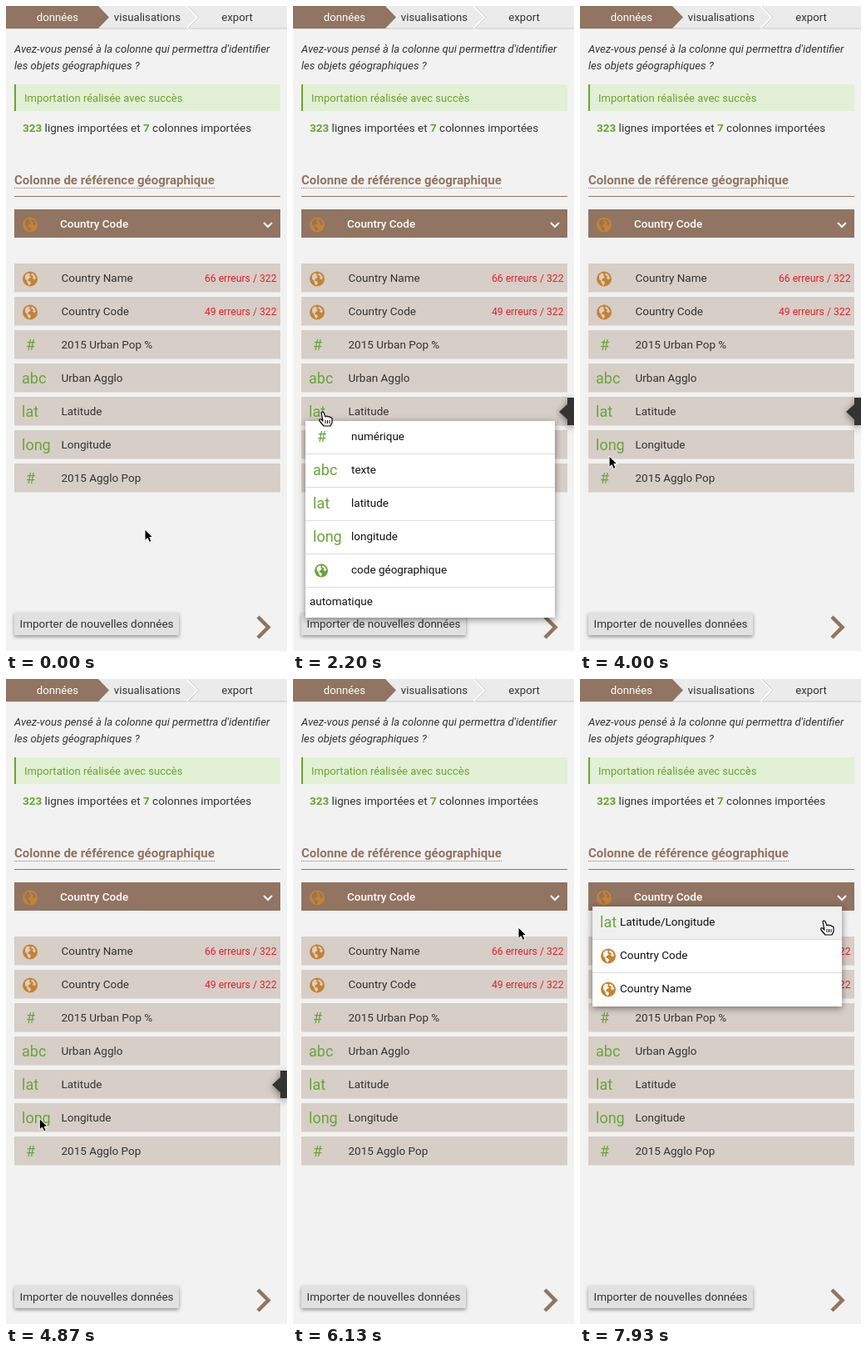
Recreate the animation shown at these times as an HTML page. Size 338x774 px, loop 8 s.

```html
<!DOCTYPE html>
<html lang="fr">
<head>
<meta charset="utf-8">
<title>Colonnes importées</title>
<style>
  html, body { margin: 0; width: 100%; height: 100%; overflow: hidden; background: #f2f2f2; }
  svg { display: block; width: 338px; height: 774px; }
  text { font: 13.5px Roboto, sans-serif; fill: #333; white-space: pre; }
  .tab { font-size: 13.2px; text-anchor: middle; }
  .hint { font-size: 13.1px; font-style: italic; }
  .success { font-size: 13px; fill: #68a52d; }
  .title { font-size: 15px; font-weight: 700; fill: #917461; }
  .count { font-weight: 700; fill: #68a52d; }
  .error { font-size: 12.2px; fill: #e3202c; text-anchor: end; }
  .icon { font-size: 18px; fill: #68a53b; }
  .white { fill: #fff; }
  .strong { font-weight: 500; }
  .menu text:not(.icon) { fill: #111; }
  .shadow { filter: drop-shadow(0 2px 4px #0007); }
  .button { filter: drop-shadow(0 2px 2px #0006); }
</style>
</head>
<body>
<svg id="stage" viewBox="0 0 338 774"></svg>
<script>
const BROWN = '#917461', GREEN = '#68a53b', ORANGE = '#c7822f', ROW = '#d7cec7';
const LOOP = 8000;

const rect = (x, y, w, h, fill, attrs = '') =>
  `<rect x="${x}" y="${y}" width="${w}" height="${h}" fill="${fill}" ${attrs}/>`;
const label = (x, y, content, cls = '') => `<text x="${x}" y="${y}" class="${cls}">${content}</text>`;
const path = (d, fill, attrs = '') => `<path d="${d}" fill="${fill}" ${attrs}/>`;
const line = (x1, y, x2, color, attrs = '') => path(`M${x1} ${y}H${x2}`, 'none', `stroke="${color}" ${attrs}`);

const globe = (x, y, color, land, r = 9) => `<g transform="translate(${x} ${y}) scale(${r / 9})">
  <circle r="9" fill="${color}"/>
  ${path('M-6-4L-3-7L0-6L-1-4L1-2L-2 0L-3 2L0 3L1 5L-1 8L-3 5L-4 2L-6 0Z', land)}
  ${path('M2-7L5-5L7-1L5 1L3-1L4-3L1-5Z', land)}</g>`;

// Type marker: a text symbol or a globe, with its row centred on y.
const marker = (x, y, kind, land) =>
  kind === 'geo' ? globe(x + 10, y + 1, ORANGE, land)
  : kind === 'code' ? globe(x + 10, y + 1, GREEN, land, 8)
  : label(kind === '#' ? x + 5 : x, y + 6, kind, 'icon');

function row([kind, name, errors], i) {
  const y = 326.5 + i * 40;
  return rect(10, y - 17.5, 320, 34.5, ROW) + marker(19, y, kind, ROW) + label(66.5, y + 4.5, name) +
    (errors ? label(325.5, y + 4.5, `${errors} erreurs / 322`, 'error') : '');
}

function menu(id, top, textX, height, items) {
  const entries = items.map(([kind, name], i) => {
    const y = top + i * 40, last = i === items.length - 1;
    const h = last ? height - i * 40 : 40;
    return rect(15, y, 300, h, '#fff', 'class="entry"') +
      (kind ? marker(24, y + 18.5, kind, '#fff') : '') +
      label(kind ? textX : 20, y + (kind ? 23 : 21), name) +
      (last ? '' : line(15, y + 39.5, 315, '#ddd'));
  });
  return `<g id="${id}" class="menu shadow">${entries.join('')}</g>`;
}

const rows = [
  ['geo', 'Country Name', 66], ['geo', 'Country Code', 49], ['#', '2015 Urban Pop %'],
  ['abc', 'Urban Agglo'], ['lat', 'Latitude'], ['long', 'Longitude'], ['#', '2015 Agglo Pop'],
];
const types = [
  ['#', 'numérique'], ['abc', 'texte'], ['lat', 'latitude'], ['long', 'longitude'],
  ['code', 'code géographique'], ['', 'automatique'],
];
const references = [['lat', 'Latitude/Longitude'], ['geo', 'Country Code'], ['geo', 'Country Name']];

// Pointer shapes, each with its hot spot at the origin.
const cursors = `
  <g id="arrow">${path('M0 0V13.5L3.2 10.6L5.4 15.5L8 14.3L5.8 9.6H9.8Z', '#000', 'stroke="#fff"')}</g>
  <g id="hand">${path('M-2 1Q-1-1 1 1L3 6Q5 4 6 6Q8 5 9 7Q11 6 11 9V13L9 17H1L-4 11Q-5 8-2 9L0 11Z',
    '#fff', 'stroke="#000" stroke-width="1.2" stroke-linejoin="round"')}
    ${path('M3 10V14M5.5 10V14M8 10V14', 'none', 'stroke="#000"')}</g>
  <g id="beam">${['#fff', '#000'].map((color, i) =>
    path('M-3-7.5Q0-7.5 0-5Q0-7.5 3-7.5M0-5V5M-3 7.5Q0 7.5 0 5Q0 7.5 3 7.5M-2 2H2', 'none',
      `stroke="${color}" stroke-width="${i ? 1.2 : 2.6}"`)).join('')}</g>`;

const stage = document.getElementById('stage');
stage.innerHTML = [
  rect(0, 0, 338, 774, '#f2f2f2'),
  rect(0, 0, 338, 27, '#ebebeb'),
  line(0, 27, 338, '#c9c9c9'),
  path('M0 0H111L124 13.5L111 27H0Z', BROWN),
  path('M218 0L231 13.5L218 27', 'none', 'stroke="#fff" stroke-width="3"'),
  path('M219 0L232 13.5L219 27', 'none', 'stroke="#bbb"'),
  label(62, 17.5, 'données', 'tab white'),
  label(170, 17.5, 'visualisations', 'tab'),
  label(278, 17.5, 'export', 'tab'),
  label(10, 56, "Avez-vous pensé à la colonne qui permettra d'identifier", 'hint'),
  label(10, 76, 'les objets géographiques ?', 'hint'),
  rect(10, 94, 320, 32, '#e2f0d5'),
  rect(10, 94, 2, 32, '#68a52d'),
  label(22, 115, 'Importation réalisée avec succès', 'success'),
  label(20, 151, '<tspan class="count">323</tspan> lignes importées et <tspan class="count">7</tspan> colonnes importées'),
  label(10, 214, 'Colonne de référence géographique', 'title'),
  line(10, 218.5, 251, BROWN, 'stroke-dasharray="1 1"'),
  line(10, 228.5, 330, BROWN),
  rect(10, 244, 320, 34, BROWN),
  globe(29, 262.5, ORANGE, BROWN),
  label(65, 266, 'Country Code', 'white strong'),
  path('M310 260L315 265L320 260', 'none', 'stroke="#fff" stroke-width="2"'),
  ...rows.map(row),
  rect(10, 728, 198, 27, '#e1e1e1', 'rx="1" class="button"'),
  label(16.5, 746, 'Importer de nouvelles données'),
  path('M303 733L315.5 745.5L303 758', 'none', `stroke="${BROWN}" stroke-width="4.5"`),
  `<g id="tooltip" class="shadow">${path('M320 487L330 478V470H338V503H330V496Z', '#333')}</g>`,
  menu('typeMenu', 498, 70, 236, types),
  menu('referenceMenu', 273, 48, 120, references),
  `<g id="cursor">${cursors}</g>`,
].join('');

const get = id => document.getElementById(id);
const show = (node, on) => { node.style.display = on ? '' : 'none'; };

// Pointer stops: time, x, y.
const stops = [
  [0, 167, 628], [350, 167, 628], [1200, 73, 498], [1550, 36, 487], [3000, 36, 487], [3700, 35, 531],
  [4000, 35, 540], [4700, 35, 535], [5400, 70, 485], [5750, 70, 485], [6130, 271, 298],
  [6900, 302, 263], [7450, 302, 263], [7800, 294, 290], [LOOP, 294, 290],
];
// Pointer shape from each time on.
const shapes = [[0, 'arrow'], [1450, 'hand'], [3750, 'arrow'], [5350, 'beam'], [5800, 'arrow'], [6700, 'hand']];
const spans = { tooltip: [1400, 5900], typeMenu: [1700, 3750], referenceMenu: [7350, LOOP] };

function pointerAt(t) {
  const i = stops.findIndex(stop => stop[0] > t);
  const [t0, x0, y0] = stops[i - 1], [t1, x1, y1] = stops[i];
  const u = (t - t0) / (t1 - t0), ease = u * u * (3 - 2 * u);
  return [x0 + (x1 - x0) * ease, y0 + (y1 - y0) * ease];
}

function draw(t) {
  const [x, y] = pointerAt(t);
  get('cursor').setAttribute('transform', `translate(${x} ${y})`);
  const shape = shapes.findLast(([start]) => t >= start)[1];
  for (const id of ['arrow', 'hand', 'beam']) show(get(id), id === shape);
  for (const [id, [start, end]] of Object.entries(spans)) show(get(id), t >= start && t < end);
  for (const entry of document.querySelectorAll('.entry')) {
    const top = +entry.getAttribute('y'), height = +entry.getAttribute('height');
    entry.setAttribute('fill', y >= top && y < top + height ? '#f0f0f0' : '#fff');
  }
}

function tick() {
  draw(performance.now() % LOOP);
  requestAnimationFrame(tick);
}
tick();
</script>
</body>
</html>
```
